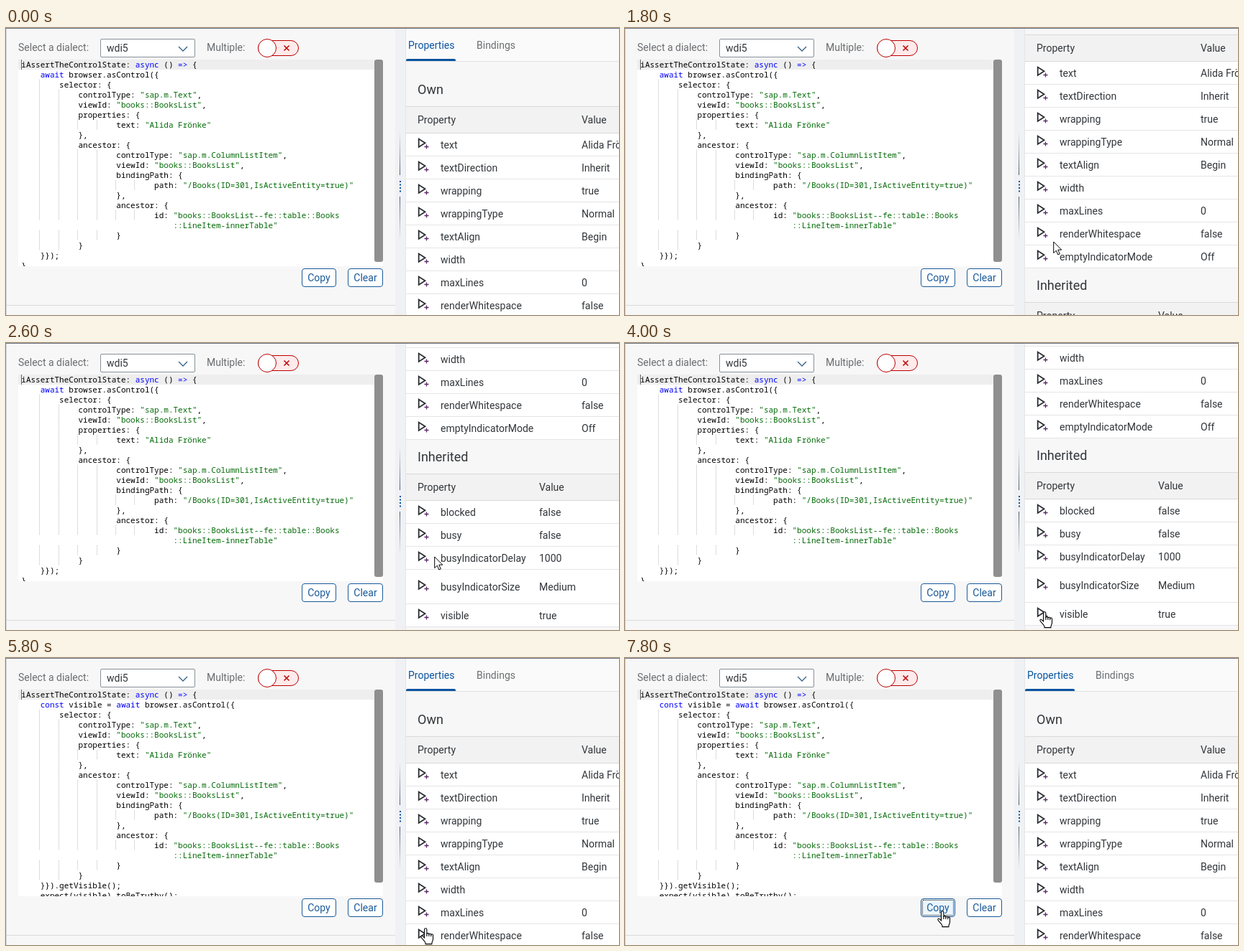
Write an HTML page that moves like this. It is 852 px wide and 400 px high and loops after 8000 ms.

```html
<!DOCTYPE html>
<html lang="en">
<head>
<meta charset="utf-8">
<title>Control inspector</title>
<style>
  html, body { margin: 0; width: 100%; height: 100%; overflow: hidden; }
  body { position: relative; background: #f7f7f7; font: 14px Roboto, Arial, sans-serif; color: #32363a; }
  #stage { position: absolute; left: 0; top: 0; width: 852px; height: 400px; overflow: hidden; }
  #stage div, #stage svg, .label { position: absolute; box-sizing: border-box; white-space: pre; }
  .label { line-height: 20px; color: #6a6d70; }
  .anim { animation: 8s step-end infinite; }

  #left { left: 0; top: 0; width: 541px; height: 400px; border-left: 1px solid #d3d6da; }
  #edge { left: 0; top: 0; width: 852px; height: 1px; background: #6b7482; }
  #divider { left: 0; top: 386px; width: 541px; height: 1px; background: #d9d9d9; }
  #select { left: 131px; top: 15px; width: 132px; height: 26px; line-height: 25px; padding-left: 8px; background: #fff; border: 1px solid #89919a; border-radius: 2px; }
  #editor { left: 17px; top: 44px; width: 507px; height: 288px; background: #fff; overflow: hidden; }
  #lines { left: 0; top: 0; width: 495px; animation-name: editor-scroll; }
  #active { left: 0; top: 0; width: 495px; height: 14px; background: #eee; }
  #caret { left: 4px; top: 0; width: 1px; height: 14px; background: #666; }
  .code { left: 4.3px; top: 0; font: 11px/14px "Noto Sans Mono", monospace; color: #000; }
  #stage .code div { position: relative; height: 14px; }
  .code i { position: absolute; left: 0; top: 0; height: 14px;
    background: repeating-linear-gradient(90deg, transparent 0 25.4px, #bbb 25.4px 26.4px);
    mask: repeating-linear-gradient(#000 0 1px, transparent 1px 2px);
    -webkit-mask: repeating-linear-gradient(#000 0 1px, transparent 1px 2px); }
  .code b { font-weight: 400; color: #00f; }
  .code em { font-style: normal; color: #036a07; }
  #before { animation-name: before; }
  #after { animation-name: after; }
  #thumb { right: 0; top: 0; width: 12px; height: 282px; background: #8f8f8f; border-radius: 3px; animation-name: thumb; }
  .button { top: 335px; height: 26px; line-height: 25px; text-align: center; color: #1a5a9a; background: #fff; border: 1px solid #1a5a9a; border-radius: 4px; }
  #copy { left: 411px; width: 48px; animation-name: copy-hover; }
  #copy-focus { inset: 1px; border: 1px dotted #000; border-radius: 2px; animation-name: copy-focus; }

  #splitter { left: 541px; top: 0; width: 14px; height: 400px; background: #eff1f4; }
  #splitter div { left: 6px; width: 1px; height: 60px; }

  #right { left: 555px; top: 0; width: 297px; height: 400px; overflow: hidden; border-left: 1px solid #e3e5e8; }
  #content { left: -556px; top: 0; width: 852px; height: 702px; animation-name: panel-scroll; }
  #tabs { left: 556px; top: 0; width: 296px; height: 47px; background: #fafafa; border-bottom: 1px solid #e2e2e2; }
  #underline { left: 556px; top: 43px; width: 69px; height: 3px; background: #0854a0; border-radius: 2px 2px 0 0; }
  .title { left: 572px; font-size: 18px; line-height: 46px; }
  .head, .row { left: 556px; width: 296px; }
  .head { height: 38px; line-height: 36px; background: #f2f2f2; border: solid #d9d9d9; border-width: 1px 0; }
  .row { background: #fff; border-bottom: 1px solid #e5e5e5; }
  .head span, .row span { position: absolute; top: 0; }
  .row svg { left: 15px; top: calc(50% - 10.5px); }
  #icon-focus { left: 571px; top: 669px; width: 18px; height: 17px; border: 1px dotted #000; animation-name: icon-focus; }

  #pointer { left: 0; top: 0; width: 0; height: 0; animation: pointer 8s step-end infinite; }
  #arrow { left: 0; top: 0; animation-name: arrow; }
  #hand { left: -8px; top: 0; animation-name: hand; }

  @keyframes editor-scroll { 0%, 62.5%, 100% { transform: none; } 57.5% { transform: translateY(-6px); } }
  @keyframes before { 0% { visibility: visible; } 62.5%, 100% { visibility: hidden; } }
  @keyframes after { 0% { visibility: hidden; } 62.5%, 100% { visibility: visible; } }
  @keyframes thumb {
    0% { top: 0; height: 282px; }
    57.5% { top: 6px; height: 282px; }
    62.5%, 100% { top: 0; height: 269px; }
  }
  @keyframes panel-scroll {
    0% { transform: none; }
    20% { transform: translateY(-100px); }
    25% { transform: translateY(-160px); }
    27.5% { transform: translateY(-200px); }
    30% { transform: translateY(-300px); }
    35% { transform: translateY(-302px); }
    62.5%, 100% { transform: none; }
  }
  @keyframes icon-focus { 0%, 62.5%, 100% { visibility: hidden; } 57.5% { visibility: visible; } }
  @keyframes copy-hover { 0% { background: #fff; } 87.5%, 100% { background: #ebf5fe; } }
  @keyframes copy-focus { 0% { visibility: hidden; } 92.5%, 100% { visibility: visible; } }
  @keyframes pointer {
    0% { transform: translate(640px, 420px); }
    7.5% { transform: translate(640px, 394px); animation-timing-function: steps(3, end); }
    15% { transform: translate(595px, 297px); }
    35% { transform: translate(595px, 297px); animation-timing-function: steps(4, end); }
    45% { transform: translate(583px, 374px); }
    57.5% { transform: translate(583px, 376px); }
    77.5% { transform: translate(583px, 376px); animation-timing-function: steps(5, end); }
    90%, 100% { transform: translate(441px, 352px); }
  }
  @keyframes arrow {
    0%, 57.5%, 80% { visibility: visible; }
    45%, 62.5%, 87.5%, 100% { visibility: hidden; }
  }
  @keyframes hand {
    0%, 57.5%, 80% { visibility: hidden; }
    45%, 62.5%, 87.5%, 100% { visibility: visible; }
  }
</style>
</head>
<body>
<div id="stage">
  <div id="left"></div>
  <span class="label" style="left:17px;top:17px">Select a dialect:</span>
  <div id="select">wdi5</div>
  <span class="label" style="left:279px;top:17px">Multiple:</span>
  <svg style="left:235px;top:10px" width="180" height="36" fill="none">
    <path d="M5 16l6 6 6-6" stroke="#346187" stroke-width="1.3"/>
    <rect x="115.5" y="7.5" width="56" height="21" rx="10.5" fill="#ffebeb" stroke="#b00"/>
    <circle cx="128" cy="18" r="12.5" fill="#fff" stroke="#b00"/>
    <path d="M151.5 14.5l7 7m0-7l-7 7" stroke="#b00" stroke-width="1.5"/>
  </svg>
  <div id="editor">
    <div id="lines" class="anim">
      <div id="active"></div>
      <div id="before" class="code anim"></div>
      <div id="after" class="code anim"></div>
      <div id="caret"></div>
    </div>
    <div id="thumb" class="anim"></div>
  </div>
  <div id="copy" class="button anim">Copy<div id="copy-focus" class="anim"></div></div>
  <div class="button" style="left:475px;width:49px">Clear</div>
  <div id="divider"></div>

  <div id="splitter">
    <div style="top:145px;background:linear-gradient(transparent,#4f5d6b)"></div>
    <div style="top:235px;background:linear-gradient(#4f5d6b,transparent)"></div>
    <svg style="left:5px;top:211px" width="4" height="20" fill="#0854a0">
      <path d="M1 2h2v2H1zm0 4.5h2v2H1zm0 4.5h2v2H1zm0 4.5h2v2H1z"/>
    </svg>
  </div>

  <div id="right">
    <div id="content" class="anim">
      <div id="tabs"></div>
      <span class="label" style="left:559px;top:14px;color:#0854a0">Properties</span>
      <span class="label" style="left:654px;top:14px">Bindings</span>
      <div id="underline"></div>
      <div id="icon-focus" class="anim" style="z-index:1"></div>
    </div>
  </div>
  <div id="edge"></div>

  <div id="pointer">
    <svg id="arrow" class="anim" width="14" height="21" fill="#fff" stroke="#000">
      <path d="M.7 1v15.6l3.6-3.4 2.5 5.8 2.5-1.1-2.5-5.7h5z"/>
    </svg>
    <svg id="hand" class="anim" width="20" height="25" fill="#fff" stroke="#000" stroke-width="1.1">
      <path d="M6.5 14V2.5a1.7 1.7 0 0 1 3.4 0v6a1.6 1.6 0 0 1 3 .4 1.6 1.6 0 0 1 2.9.7 1.5 1.5 0 0 1 2.7 1v5.5c0 2-1.6 3.2-1.6 5.3v1.2H8v-1.4C7.3 18.5 3 15.5 2 13c-.6-1.7 1.4-2.3 2.4-1.2z"/>
      <path d="M9.9 8v4m3-3v3m2.9-2.3v2.6"/>
    </svg>
  </div>
</div>

<script>
const body = `    selector: {
        controlType: "sap.m.Text",
        viewId: "books::BooksList",
        properties: {
                text: "Alida Frönke"
        },
        ancestor: {
                controlType: "sap.m.ColumnListItem",
                viewId: "books::BooksList",
                bindingPath: {
                        path: "/Books(ID=301,IsActiveEntity=true)"
                },
                ancestor: {
                        id: "books::BooksList--fe::table::Books
                            ::LineItem-innerTable"
                }
        }`.split("\n").map(line => "    " + line);

const paint = text => text.replace(/"[^"]*"?|::LineItem.*|\b(async|await|const)\b|=>/g,
  token => /^[":]/.test(token) ? `<em>${token}</em>` : `<b>${token}</b>`);

function lineHtml(line) {
  const indent = line.search(/\S/);
  const guides = line.includes("::LineItem") ? 0 : Math.max(0, indent - 4);
  return `<div><i style="width:${guides * 6.6}px"></i>${paint(line)}</div>`;
}

function showCode(id, call, ...tail) {
  const lines = ["iAssertTheControlState: async () => {", `    ${call}browser.asControl({`, ...body, ...tail, "}"];
  document.getElementById(id).innerHTML = lines.map(lineHtml).join("");
}

showCode("before", "await ", "    }});");
showCode("after", "const visible = await ", "    }}).getVisible();", "    expect(visible).toBeTruthy();");

const icon = `<svg width="20" height="18" fill="none">
  <path d="M2.7 2.6v11.3l8.8-5.6z" stroke="#2a2d31" stroke-width="1.8"/>
  <path d="M13.5 10.5v6m-3-3h6" stroke="#5b2a68" stroke-width="1.3"/></svg>`;

function addGroup(top, title, valueX, rows) {
  const cells = (name, nameX, value) =>
    `<span style="left:${nameX - 556}px">${name}</span><span style="left:${valueX - 556}px">${value}</span>`;
  let html = `<div class="title" style="top:${top}px">${title}</div>
    <div class="head" style="top:${top + 46}px">${cells("Property", 572, "Value")}</div>`;
  let y = top + 84;
  for (const [name, value, height = 32] of rows) {
    html += `<div class="row" style="top:${y}px;height:${height}px;line-height:${height}px">${icon}${cells(name, 604, value)}</div>`;
    y += height;
  }
  document.getElementById("content").insertAdjacentHTML("beforeend", html);
}

addGroup(63, "Own", 800, [
  ["text", "Alida Frönke"], ["textDirection", "Inherit"], ["wrapping", "true"],
  ["wrappingType", "Normal"], ["textAlign", "Begin"], ["width", ""],
  ["maxLines", "0"], ["renderWhitespace", "false"], ["emptyIndicatorMode", "Off"]
]);
addGroup(436, "Inherited", 741, [
  ["blocked", "false"], ["busy", "false"], ["busyIndicatorDelay", "1000"],
  ["busyIndicatorSize", "Medium", 48], ["visible", "true"]
]);
</script>
</body>
</html>
```
